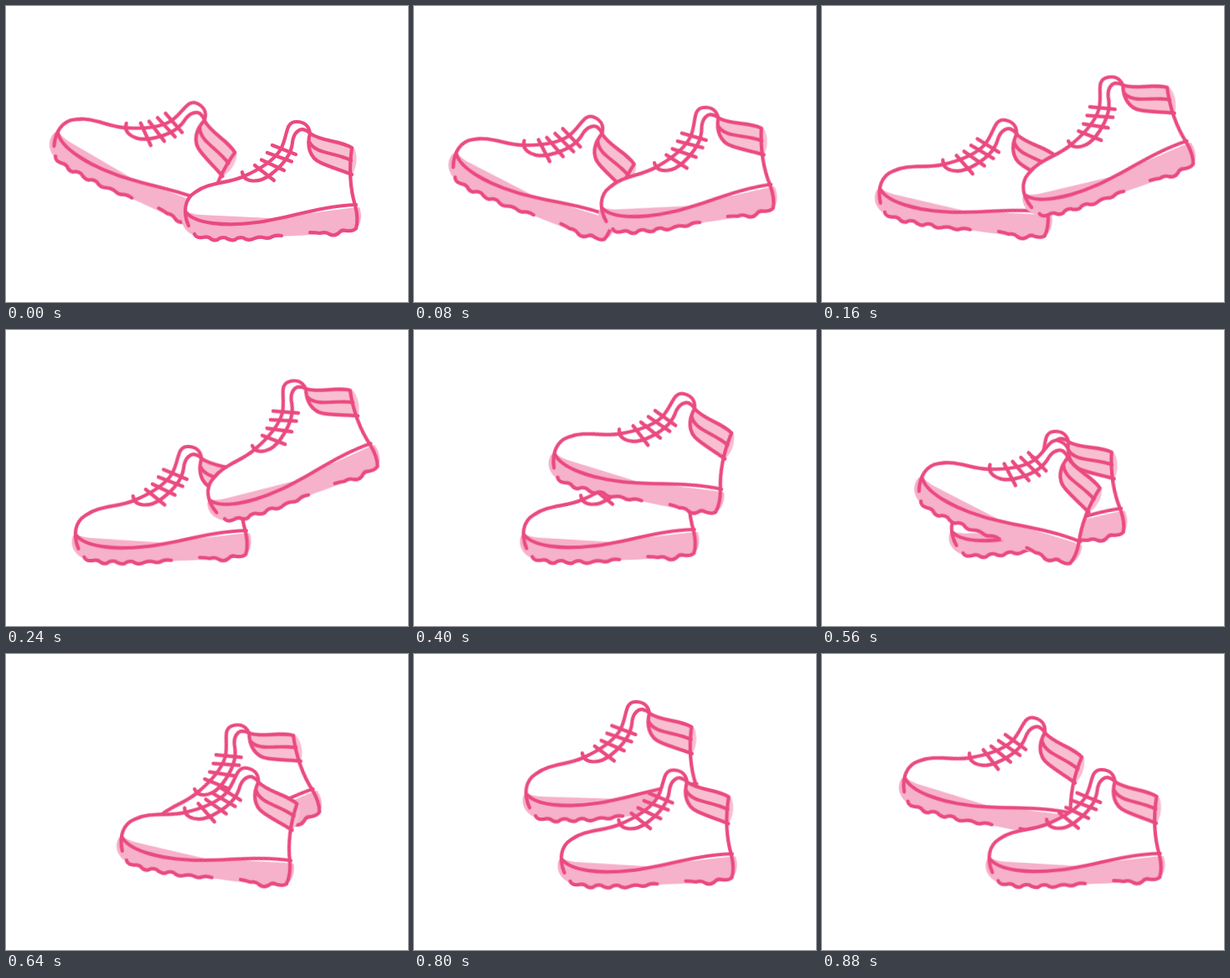
An HTML page without scripts for the animation above (0.96 s loop, 480 px wide and 353 px high).

```html
<!DOCTYPE html>
<html lang="en">
<head>
<meta charset="utf-8">
<title>Walking boots</title>
<style>
  html, body { margin: 0; width: 100%; height: 100%; overflow: hidden; background: #fff; }
  svg { display: block; width: 480px; height: 353px; }

  .sole { fill: #f6b1cb; }
  .collar { fill: #f8bfd1; }
  .ink { fill: none; stroke: #ea4a80; stroke-width: 4.2; stroke-linecap: round; stroke-linejoin: round; }

  .step { animation: walk 960ms step-end infinite; }
  .far .step { animation-delay: -480ms; }

  /* Each pose places the top of the tongue, then tilts the boot around it. */
  @keyframes walk {
    0%      { transform: translate(347px, 148px) rotate(0deg); }
    8.333%  { transform: translate(347px, 131px) rotate(-5.5deg); }
    16.666% { transform: translate(342.8px, 95px) rotate(-16deg); }
    25%     { transform: translate(341.5px, 71px) rotate(-17deg); }
    33.333% { transform: translate(334px, 67px) rotate(-1deg); }
    41.666% { transform: translate(320.5px, 86px) rotate(14.4deg); }
    50%     { transform: translate(293.5px, 125.5px) rotate(27.5deg); }
    58.333% { transform: translate(280.5px, 142px) rotate(24.5deg); }
    66.666% { transform: translate(286.3px, 146px) rotate(10.4deg); }
    75%     { transform: translate(286.5px, 149px) rotate(1deg); }
    83.333% { transform: translate(310px, 148.5px) rotate(0.7deg); }
    91.666% { transform: translate(333.8px, 148px) rotate(0.7deg); }
  }
</style>
</head>
<body>
<svg viewBox="0 0 480 353" role="img" aria-label="A pair of boots walking">
  <defs>
    <path id="outline" d="M218 262C211 246 213 230 226 222C243 210 262 212 282 204C303 195 320 184 328 171C337 154 333 138 347 138C357 138 362 144 363 152C378 162 397 160 413 169C410 190 410 215 417 238C420 250 420 258 418 265"/>
    <g id="boot" transform="translate(-347 -148)">
      <use href="#outline" fill="#fff"/>
      <path class="sole" d="M211 247C216 244 224 249 232 249L316 253C350 250 385 243 422 240C426 250 424 264 414 269C395 272 340 274 328 275C300 277 240 280 232 276C218 274 206 262 211 247Z"/>
      <path class="collar" d="M363 152C380 161 398 160 415 168C420 176 420 190 414 200C396 195 385 193 376 187C363 180 361 165 363 152Z"/>
      <g class="ink">
        <use href="#outline"/>
        <!-- sole and tread -->
        <path d="M215 246C226 260 262 263 300 258S372 239 418 237"/>
        <path d="M225 272q2 5 10 4q6-2 10 2q6 3 10-1q6-2 10 1q7 3 11-1q6-2 10 1q6 2 11-1q6-2 10-1q7 2 11-1q5-2 11-1"/>
        <path d="M363 270q7 0 12 1q6-2 11 1q6 3 11-1q4-5 9-3q9 1 12-3"/>
        <!-- tongue and collar -->
        <path d="M282 198C284 212 303 211 316 201C333 188 341 174 342 163C343 151 351 145 357 148Q361 149 363 152"/>
        <path d="M363 152C359 166 362 181 376 187C387 192 400 196 413 201"/>
        <path d="M362 162C370 177 392 174 412 184"/>
        <!-- laces -->
        <path d="M318 166L346 177M312 175L341 185.500M305 183.500L332 196M297 190L320 208"/>
      </g>
    </g>
  </defs>

  <g class="far" transform="translate(-69 0)"><g class="step"><use href="#boot"/></g></g>
  <g class="step"><use href="#boot"/></g>
</svg>
</body>
</html>
```
